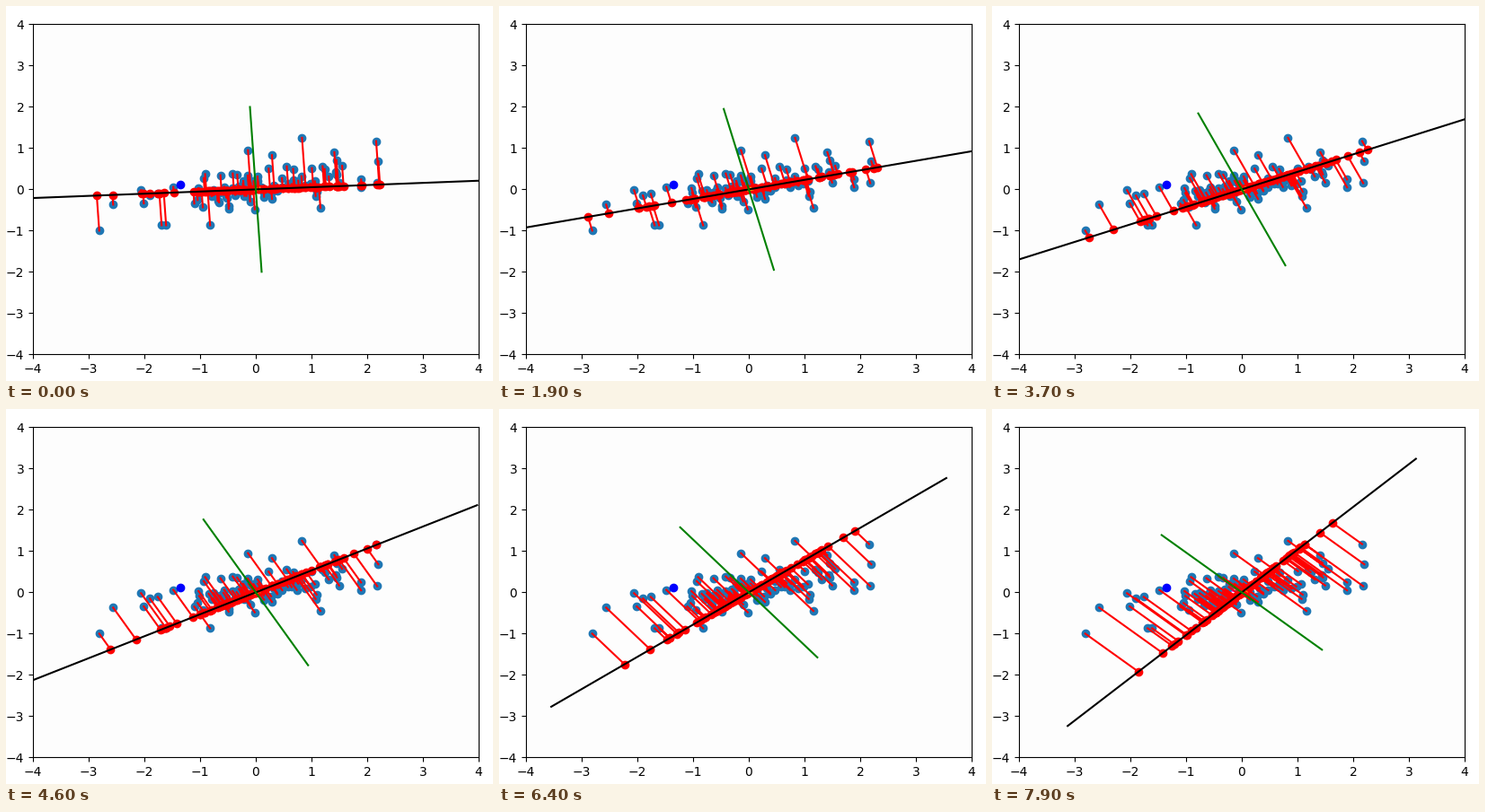
A matplotlib script for the animation above (8000 ms loop, 542x418 px).

```python
import numpy as np
import matplotlib.pyplot as plt
from matplotlib.animation import FuncAnimation

W, H, DPI = 542, 418, 100
FRAMES, INTERVAL = 80, 100
LEFT, TOP, AX_W, AX_H = 29.995, 20.4, 496, 368
START_DEGREES, AXIS_REACH, NORMAL_REACH = 3, 4.5, 2
N_POINTS = 100

plt.rcParams["font.family"] = "DejaVu Sans"

# Key points that shape the rim of the cloud.
RIM = [
    (-2.81, -1), (-2.56, -.37), (-2.06, -.02), (-2.01, -.34), (-1.9, -.15),
    (-1.76, -.11), (-1.69, -.87), (-1.61, -.87), (-1.48, .06), (-.91, .37),
    (-.82, -.87), (-.14, .95), (.29, .83), (.83, 1.25), (1.16, -.45),
    (1.41, .9), (1.55, .57), (1.89, .05), (1.89, .24), (2.16, 1.17),
    (2.2, .68), (2.18, .15),
]


def make_cloud():
    """Rim points plus a dense core that leans slightly upwards to the right."""
    rng = np.random.default_rng(7)
    count = N_POINTS - len(RIM)
    x = np.linspace(-1.27, 1.4, count) + rng.normal(0, .04, count)
    x -= .22 * np.sin(np.pi * (x + .25) / 1.4)
    y = .03 + .14 * x + rng.uniform(-.5, .5, count) * rng.uniform(.3, 1.1, count)
    return np.vstack([RIM, np.column_stack([x, y])])


def step_at(ms):
    """Number of one-degree turns made; there is a short pause after the ninth."""
    if ms < 1900:
        return min(9, (ms + 40) // 180)
    return (ms - 90) // 180


def set_through_origin(line, vector):
    line.set_data([-vector[0], vector[0]], [-vector[1], vector[1]])


points = make_cloud()

fig = plt.figure(figsize=((W + .001) / DPI, (H + .001) / DPI), dpi=DPI,
                 facecolor="white")
ax = fig.add_axes([LEFT / W, 1 - (TOP + AX_H) / H, AX_W / W, AX_H / H],
                  facecolor="#fdfdfd")
ax.set(xlim=(-4, 4), ylim=(-4, 4), xticks=range(-4, 5), yticks=range(-4, 5))

ax.plot([-.25, .28], [.06, -.08], color="magenta", zorder=.9)
ax.scatter(*points.T, color="#1f77b4", zorder=1)
feet = ax.scatter(*points.T, color="red", zorder=1.2)
ax.plot([0, .07], [0, .02], color="orange", lw=3, zorder=1.3)
ax.scatter([-1.35], [.11], color="blue", zorder=2.1)
links, = ax.plot([], [], color="red")
axis_line, = ax.plot([], [], color="black")
normal_line, = ax.plot([], [], color="green")


def update(frame):
    angle = np.radians(START_DEGREES + step_at(frame * INTERVAL))
    direction = np.array([np.cos(angle), np.sin(angle)])
    normal = np.array([-direction[1], direction[0]])
    projected = np.outer(points @ direction, direction)

    feet.set_offsets(projected)
    gaps = np.full_like(points, np.nan)
    links.set_data(*np.stack([points, projected, gaps], axis=1).reshape(-1, 2).T)
    set_through_origin(axis_line, AXIS_REACH * direction)
    set_through_origin(normal_line, NORMAL_REACH * normal)
    return feet, links, axis_line, normal_line


anim = FuncAnimation(fig, update, frames=FRAMES, interval=INTERVAL,
                     repeat=True, repeat_delay=0, blit=False)
plt.show()
```
